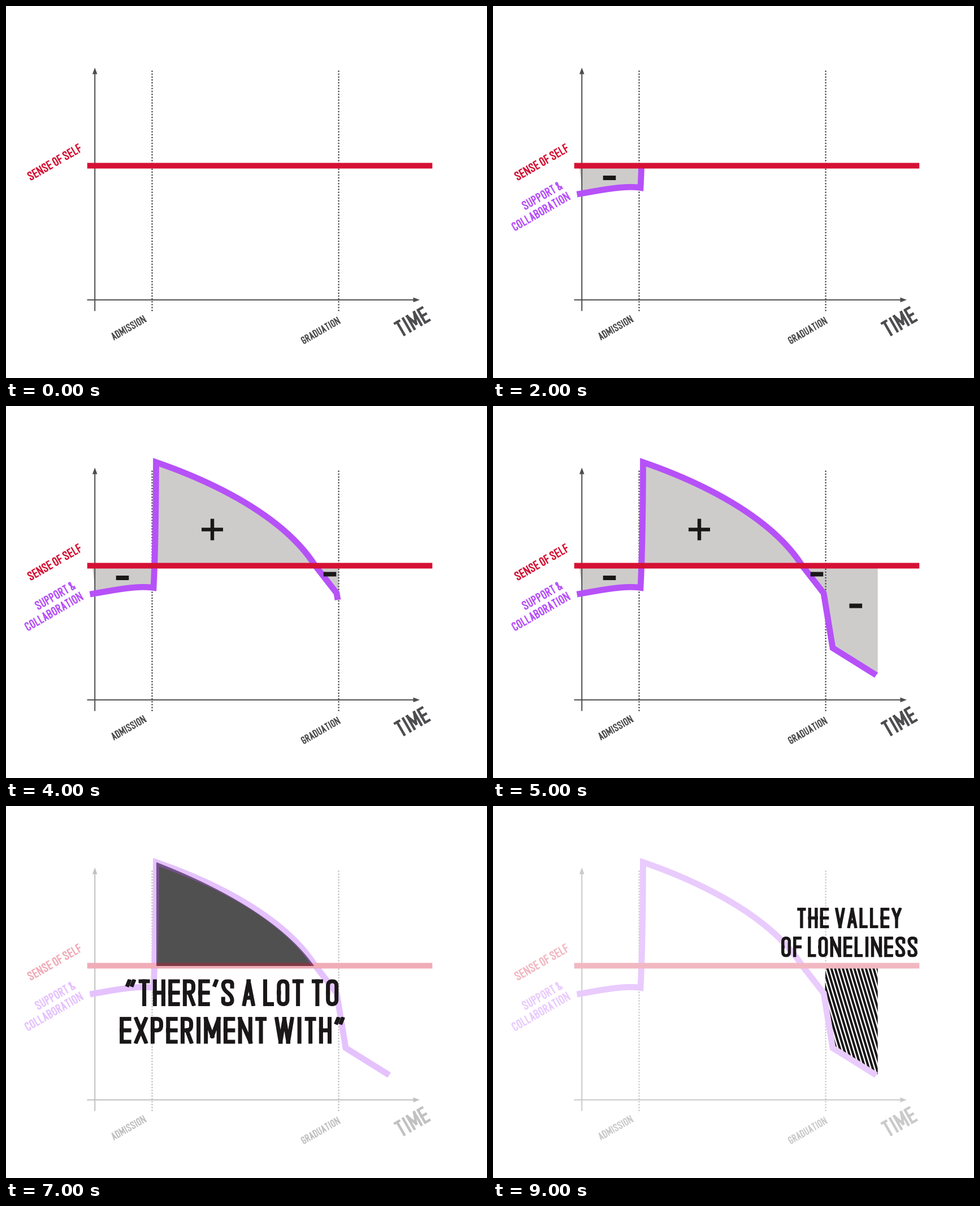
Write a matplotlib script that moves like this. It is 851 by 658 pixels and loops after 10000 ms.

```python
import math

import matplotlib.pyplot as plt
import numpy as np
from matplotlib.animation import FuncAnimation
from matplotlib.patches import PathPatch, Polygon
from matplotlib.path import Path

W, H, DPI = 851, 658, 64
PT = 72 / DPI  # points per pixel

GREY, RED, PURPLE = "#4d4d4f", "#d51134", "#b651f8"
FILL, DARK, INK = "#cecccb", "#505050", "#1a1718"

# Condensed lettering. Anchors a..o form a grid of 3 columns and 5 rows;
# a capital anchor is a rounded corner.
ANCHORS = {ch: (i % 3 / 2, 1 - i // 3 / 4) for i, ch in enumerate("abcdefghijklmno")}
ANCHORS.update(p=(.2, .28), q=(.8, .28), s=(.25, 0), t=(.75, 0),
               u=(.25, 1), v=(0, .84), w=(.75, .84),
               r=(1, .77), z=(0, .23), x=(0, .67), y=(1, .33))
ANCHORS["1"], ANCHORS["2"] = (.55, .45), (1, .45)
STROKES = {
    "A": "mb ob pq", "B": "maCIg gIOm", "C": "rCAMOl", "D": "maCOma",
    "E": "camo gi", "F": "cam gi", "G": "rCAMO21", "H": "am co gi",
    "I": "bn", "L": "amo", "M": "am co ak ck", "N": "am co ao",
    "O": "gACOMg", "P": "maCIg", "R": "maCIg ho", "S": "rCAXYOMz",
    "T": "ac bn", "U": "aMOc", "V": "an cn", "W": "as sb bt tc",
    "X": "ao cm", "Y": "ah ch hn", "&": "oDABEJMNl",
    "’": "cv", "“": "uv cw", "”": "uv cw",
}
WIDTHS = {"E": .43, "F": .41, "L": .4, "I": .18, "M": .62, "N": .53, "T": .42,
          "W": .72, "X": .5, "A": .48, "V": .48, "Y": .48, "S": .48, "&": .52,
          "’": .2, "“": .37, "”": .37}
WEIGHT, GAP, SPACE, ROUND = .148, .11, .19, .17


def stroke_path(anchors, left, width):
    """Vertices and codes of one pen stroke, in cap heights."""
    pts = []
    for ch in anchors:
        c, r = ANCHORS[ch.lower()]
        pts.append(np.array([left + WEIGHT / 2 + c * (width - WEIGHT),
                             WEIGHT / 2 + r * (1 - WEIGHT)]))
    verts, codes = [pts[0]], [Path.MOVETO]
    for i in range(1, len(pts)):
        p = pts[i]
        if anchors[i].isupper() and i < len(pts) - 1:
            back, ahead = pts[i - 1] - p, pts[i + 1] - p
            lb, la = np.hypot(*back), np.hypot(*ahead)
            verts += [p + back / lb * min(ROUND, lb / 2), p,
                      p + ahead / la * min(ROUND, la / 2)]
            codes += [Path.LINETO, Path.CURVE3, Path.CURVE3]
        else:
            verts.append(p)
            codes.append(Path.LINETO)
    return verts, codes


def letter(text, x, y, cap, color, angle=0, centered=False):
    """Draw text with its baseline starting (or centred) at x, y."""
    verts, codes, pen = [], [], 0
    for ch in text:
        if ch == " ":
            pen += SPACE
            continue
        width = WIDTHS.get(ch, .465)
        for s in STROKES[ch].split():
            v, c = stroke_path(s, pen, width)
            verts += v
            codes += c
        pen += width + GAP
    length = pen - GAP
    ca, sa = math.cos(math.radians(angle)), math.sin(math.radians(angle))

    def place(pts):
        pts = np.array(pts, float) * cap
        if centered:
            pts[:, 0] -= length * cap / 2
        return np.column_stack([x + pts[:, 0] * ca - pts[:, 1] * sa,
                                y - pts[:, 0] * sa - pts[:, 1] * ca])

    ink = ax.add_patch(PathPatch(Path(place(verts), codes), fill=False, ec=color,
                                 lw=WEIGHT * cap * PT, capstyle="projecting",
                                 joinstyle="miter", snap=False))
    box = place([(-.3, 0), (length + .3, 0), (length + .3, 1), (-.3, 1)])
    ink.set_clip_path(Path(box, closed=False), ax.transData)


def quote(lines, x, y, cap):
    for i, line in enumerate(lines):
        letter(line, x, y + i * cap * 1.4, cap, INK, centered=True)


def shape(pts, color, **kw):
    return ax.add_patch(Polygon(pts, closed=True, fc=color, ec="none", lw=0,
                                snap=False, **kw))


def rect(x0, y0, x1, y1, color, **kw):
    return shape([(x0, y0), (x1, y0), (x1, y1), (x0, y1)], color, **kw)


def line(pts, color, width, **kw):
    return ax.add_patch(PathPatch(Path(pts), fill=False, ec=color, lw=width * PT,
                                  capstyle="butt", joinstyle="miter",
                                  snap=False, **kw))


def bezier(*ctrl, n=50):
    t = np.linspace(0, 1, n)[:, None]
    d = len(ctrl) - 1
    return sum(math.comb(d, k) * t**k * (1 - t)**(d - k) * np.array(p)
               for k, p in enumerate(ctrl))


def fade(color, keep):
    rgb = np.array([int(color[i:i + 2], 16) for i in (1, 3, 5)]) / 255
    return tuple(1 - keep * (1 - rgb))


# The support curve, in sections.
lead = bezier((148.5, 333), (190, 326), (232, 317), (261, 321.5))
rise = bezier((261, 321.5), (265, 245), (265.5, 99.5))
fall = bezier((265.5, 99.5), (372, 136), (492, 197), (546, 281))
knee, drop, end = (585, 331), (601, 428), (678, 476)
FULL = np.vstack([lead, rise[1:], fall[1:], [knee, drop, end]])


def curve(i):
    """The part of the support curve visible in step i."""
    if i == 2:
        return np.vstack([lead, rise[1:][rise[1:, 1] > 281]])
    if i == 3:
        return np.vstack([lead, rise[1:], fall[1:][fall[1:, 1] < 275]])
    if i == 4:
        return np.vstack([lead, rise[1:], fall[1:], [knee, (587, 343)]])
    return FULL


AREAS = [
    [(153, 286), (262, 286), (261, 321), (158, 327)],
    np.vstack([fall, [(546, 283), (263, 283)], rise[rise[:, 1] < 283]]),
    [(548, 283), (589, 283), (589, 336), (585, 331)],
    [(588.5, 283), (680.7, 283), (680.7, 474), (678, 476), drop, (587, 340)],
]
SHADES = [
    [(153, 286), (260, 286), (260, 320.5), (157, 326)],
    np.vstack([bezier((266, 99.5), (368, 139), (488, 201), (545, 283)),
               [(266, 283)]]),
    [(548, 283), (588.5, 283), (588.5, 335), (585, 331)],
]
QUOTES = [
    (("“I WANT TO GO", "TO LPADR”"), 200.5, 241, 20.8),
    (("“THERE’S A LOT TO", "EXPERIMENT WITH”"), 400, 354, 47.6),
    (("“THERE IS NO TIME", "TO EXPERIMENT”"), 568.5, 216.3, 36.5),
    (("THE VALLEY", "OF LONELINESS"), 630.5, 216.3, 36.5),
]


def signs(count):
    def minus(x, y):
        rect(x - 11.3, y - 4, x + 11.3, y + 4, INK)

    if count > 0:
        minus(206, 304)
    if count > 1:
        rect(346, 215.3, 384, 221.7, INK)
        rect(361.8, 199.5, 368.2, 237.5, INK)
    if count > 2:
        minus(573, 297.5)
    if count > 3:
        minus(641.8, 353.5)


def stripes():
    mask = Path(AREAS[3] + [AREAS[3][0]])
    for x in np.arange(520, 690, 6.8):
        s = line([(x, 275), (x + 63, 485)], INK, 4.1)
        s.set_clip_path(mask, ax.transData)


def axes_and_dots(color):
    line([(157.2, 118), (157.2, 539.5)], color, 2)
    shape([(157.2, 109), (152.9, 120.5), (161.5, 120.5)], color)
    line([(143.5, 519.8), (722, 519.8)], color, 2)
    shape([(732, 519.8), (720.5, 515.5), (720.5, 524.1)], color)
    for x in (258.5, 588.6):
        ax.plot([x, x], [115.5, 538.5], color=color, lw=2.8 * PT, snap=False,
                ls=(0, (.01, 1.81)), dash_capstyle="round", zorder=1)


def draw(i):
    ax.cla()
    ax.set(xlim=(0, W), ylim=(H, 0))
    ax.axis("off")
    keep = 1 if i < 6 else .3 if i == 9 else .35
    grey, red, purple = (fade(c, keep) for c in (GREY, RED, PURPLE))

    count = min(i - 1, 4) if 2 <= i <= 5 else 0
    for area in AREAS[:count]:
        shape(area, FILL)
    axes_and_dots(grey)
    if i == 9:
        stripes()
    if i:
        line(curve(i), purple, 10.8)
    rect(143.7, 277.5, 754.3, 287.5, red)

    if 6 <= i <= 8:
        shade = shape(SHADES[i - 6], DARK)
        line(FULL, PURPLE, 10.8, alpha=keep).set_clip_path(shade)
        rect(143.7, 277.5, 754.3, 287.5, RED, alpha=keep).set_clip_path(shade)
    signs(count)

    letter("SENSE OF SELF", 44.3, 309.5, 16.4, red, 30)
    if i:
        letter("SUPPORT &", 57.5, 361.5, 16.4, purple, 30)
        letter("COLLABORATION", 39.3, 398.8, 16.2, purple, 30)
    letter("ADMISSION", 191.3, 591.8, 14, grey, 30)
    letter("GRADUATION", 527.3, 598.8, 13.9, grey, 30)
    letter("TIME", 700.3, 586.5, 30.2, grey, 30)
    if i >= 6:
        quote(*QUOTES[i - 6])
    return []


fig = plt.figure(figsize=(W / DPI, H / DPI), dpi=DPI, facecolor="white")
ax = fig.add_axes([0, 0, 1, 1])
anim = FuncAnimation(fig, draw, frames=10, interval=1000, repeat=True,
                     repeat_delay=0, blit=False)
plt.show()
```
